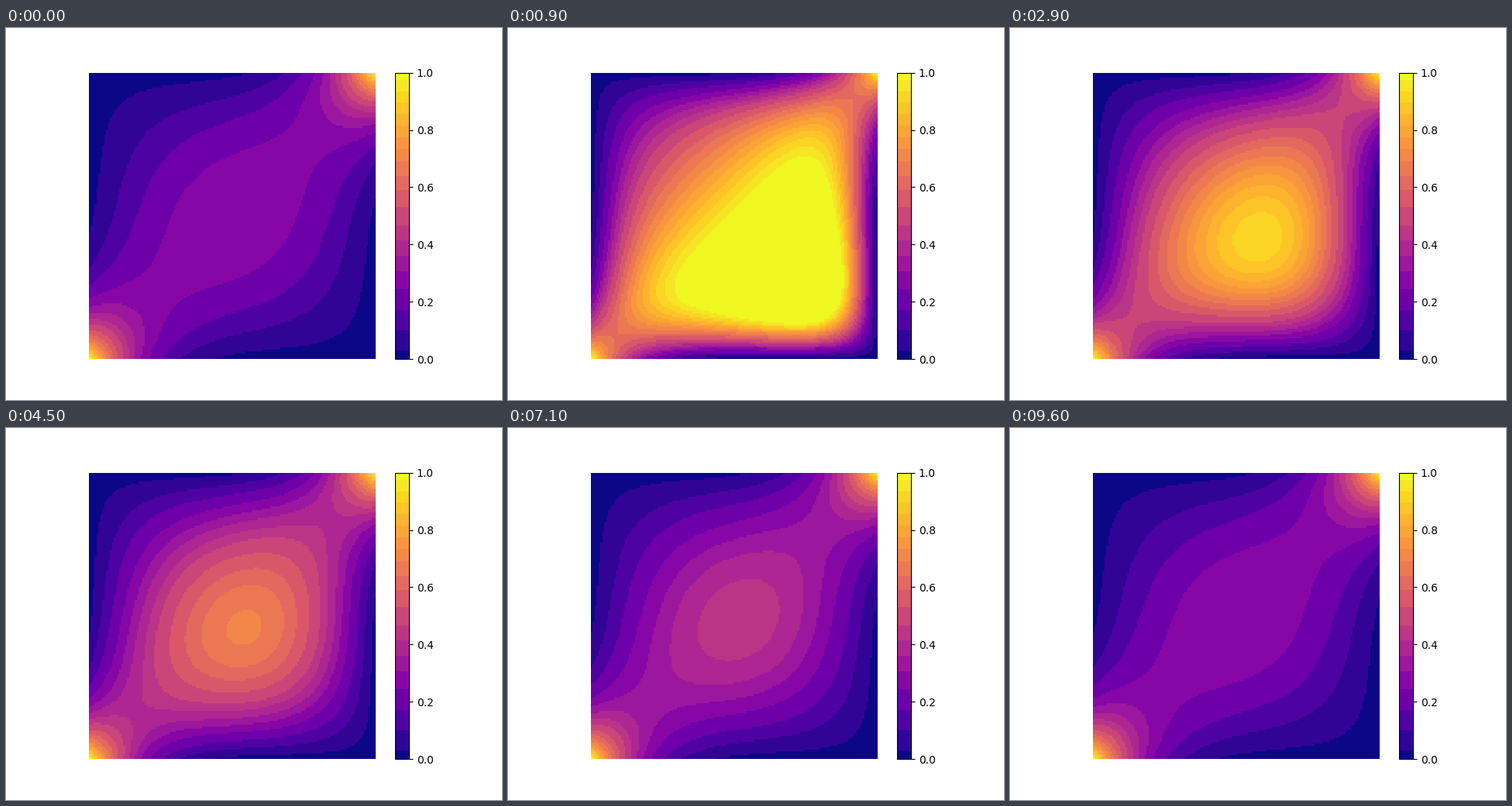
These frames come from a looping animation (640 by 480 pixels, 9.7 s). A matplotlib script:

```python
import numpy as np
import matplotlib.pyplot as plt
from matplotlib.animation import FuncAnimation
from matplotlib.colors import ListedColormap

N = 150            # grid points per side
FRAMES = 97
INTERVAL = 100     # ms
DIFFUSION = 0.001  # diffusivity times time per frame, unit square

# Edges of the flat colour bands
EDGES = [0.03, 0.1, 0.17, 0.245, 0.307, 0.36, 0.415, 0.465, 0.53, 0.59,
         0.64, 0.69, 0.735, 0.775, 0.815, 0.855, 0.895, 0.935, 0.975]


def banded_plasma(size=1000):
    """Plasma reduced to flat bands, with the exact end colours."""
    edges = np.array(EDGES)
    shades = np.concatenate([[0], (edges[:-1] + edges[1:]) / 2, [1]])
    values = (np.arange(size) + 0.5) / size
    return ListedColormap(plt.get_cmap("plasma")(shades[np.digitize(values, edges)]))


def boundary(s):
    """Fixed edge values, hot at the lower left and upper right corners."""
    edge = np.zeros((N, N))
    edge[0, :] = s ** 6
    edge[:, 0] = s ** 6
    edge[-1, :] = (1 - s) ** 6
    edge[:, -1] = (1 - s) ** 6
    return edge


class Heat:
    """Heat equation on a square, solved in the eigenmodes of the grid."""

    def __init__(self):
        s = np.linspace(0, 1, N)
        m = N - 2
        lap = (np.eye(m, k=1) + np.eye(m, k=-1) - 2 * np.eye(m)) * (N - 1) ** 2
        self.rates, self.modes = np.linalg.eigh(lap)
        self.edge = boundary(s)

        feed = np.zeros((m, m))
        feed[0, :] += self.edge[0, 1:-1]
        feed[-1, :] += self.edge[-1, 1:-1]
        feed[:, 0] += self.edge[1:-1, 0]
        feed[:, -1] += self.edge[1:-1, -1]
        feed *= (N - 1) ** 2

        total = self.rates[:, None] + self.rates[None, :]
        self.steady = -self.to_modes(feed) / total
        start = s[1:-1, None] + s[None, 1:-1]
        self.excess = self.to_modes(start) - self.steady
        self.decay = total * DIFFUSION

    def to_modes(self, field):
        return self.modes.T @ field @ self.modes

    def at(self, step):
        coeffs = self.steady + self.excess * np.exp(self.decay * step)
        field = self.edge.copy()
        field[1:-1, 1:-1] = self.modes @ coeffs @ self.modes.T
        return field


heat = Heat()


def state(frame):
    # The loop opens on the final state, then restarts the cooling
    return heat.at((frame - 1) % FRAMES)


fig, ax = plt.subplots(figsize=(6.4, 4.8), dpi=100)
image = ax.imshow(state(0), cmap=banded_plasma(), vmin=0, vmax=1,
                  interpolation="nearest")
ax.axis("off")
fig.colorbar(image, ax=ax, ticks=np.linspace(0, 1, 6), format="%.1f")


def update(frame):
    image.set_data(state(frame))
    return [image]


anim = FuncAnimation(fig, update, frames=FRAMES, interval=INTERVAL,
                     repeat=True, repeat_delay=0, blit=False)
plt.show()
```
